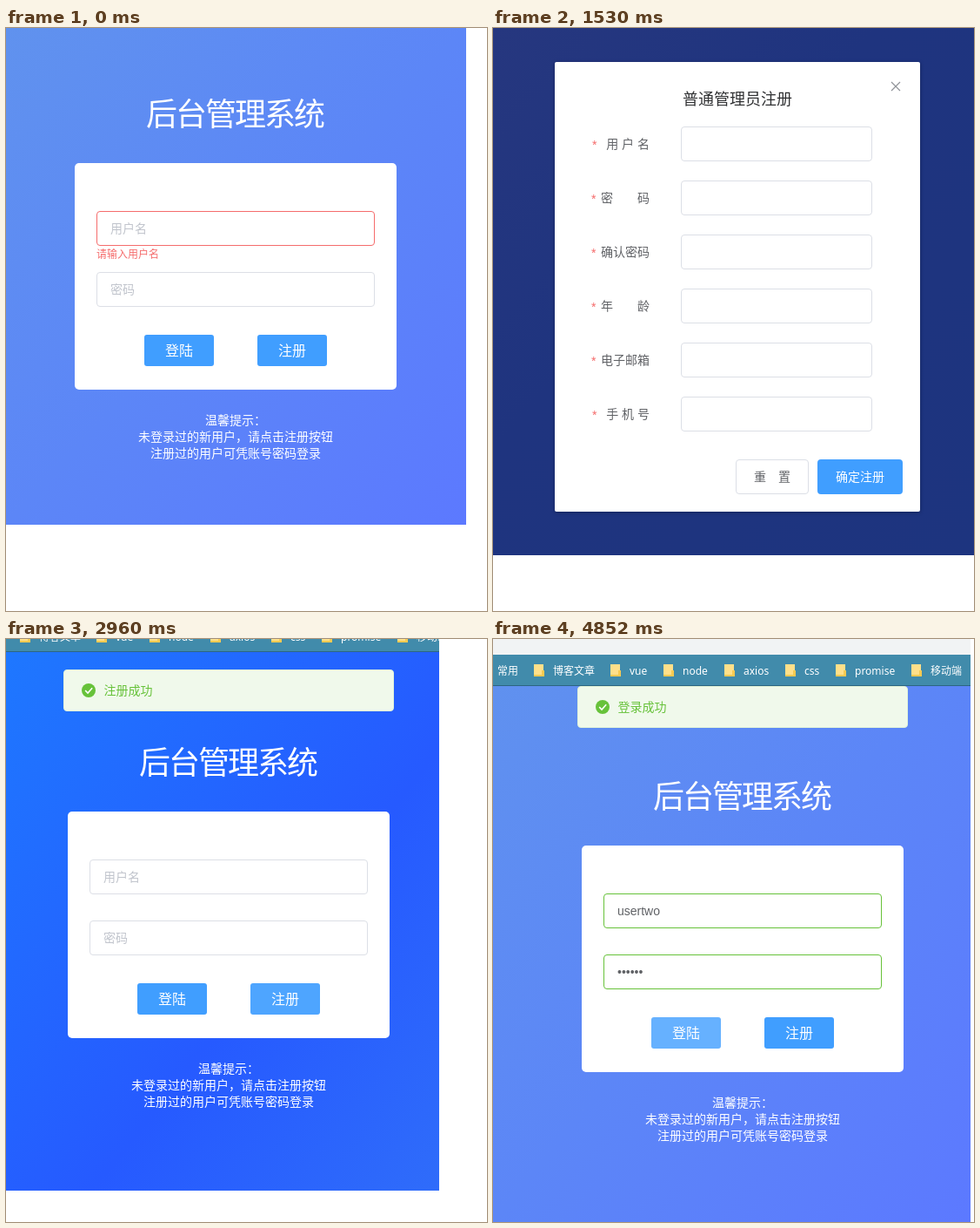
Animation of 553x669 px, one loop 5160 ms. Source, as an HTML page:

```html
<!DOCTYPE html>
<html lang="zh-CN">
<head>
<meta charset="utf-8">
<style>
html, body { margin: 0; width: 100%; height: 100%; overflow: hidden; background: #fff; }
#stage { display: block; }
text { font: 14px "Liberation Sans", "Noto Sans CJK SC", "Noto Sans CJK", sans-serif; white-space: pre; }
.mid { font-family: "Noto Sans CJK TC", sans-serif; }
.mark { font-family: "Noto Sans", "Noto Sans CJK SC", sans-serif; }
.dialog { filter: drop-shadow(0 1px 2px rgba(0, 0, 0, .3)); }
</style>
</head>
<body>
<svg id="stage" width="553" height="669"></svg>
<script>
const BLUE = '#409eff', HOVER = '#66b1ff', GREEN = '#67c23a', RED = '#f56c6c';
const LINE = '#dcdfe6', INK = '#606266', HINT = '#c0c4cc';
const USER = 'usertwo', DOTS = '••••••';

// y is the vertical centre of the line
const text = (x, y, s, fill, { size = 14, anchor = 'start', more = '' } = {}) =>
  `<text x="${x}" y="${y + Math.round(size * .37)}" fill="${fill}" text-anchor="${anchor}" style="font-size:${size}px;${more}">` +
  s.replace(/[，：]/g, '<tspan class="mid">$&</tspan>') + '</text>';
const centred = (x, y, s, fill, size) => text(x, y, s, fill, { size, anchor: 'middle' });

const rect = (x, y, w, h, fill, r = 0, extra = '') =>
  `<rect x="${x}" y="${y}" width="${w}" height="${h}" rx="${r}" fill="${fill}" ${extra}/>`;
const outlined = (x, y, w, h, stroke, fill = '#fff') =>
  rect(x + .5, y + .5, w - 1, h - 1, fill, 3.5, `stroke="${stroke}"`);
const group = (x, y, body) => `<g transform="translate(${x} ${y})">${body}</g>`;

const tick = (x, y, r) => `<circle cx="${x}" cy="${y}" r="${r}" fill="${GREEN}"/>` +
  `<path d="M${x - r * .48} ${y}l${r * .36} ${r * .38} ${r * .64} ${-r * .72}" fill="none" stroke="#fff" stroke-width="${r * .2}"/>`;

let gradients = 0;
function page(w, h, stops, body) {
  const id = 'bg' + gradients++;
  const list = stops.map(([at, c]) => `<stop offset="${at}" stop-color="${c}"/>`).join('');
  return `<svg width="${w}" height="${h}"><linearGradient id="${id}" x2="1" y2="1">${list}</linearGradient>` +
    rect(0, 0, w, h, `url(#${id})`) + body + '</svg>';
}

function login(x, y, { user, pass, userLine = LINE, passLine = LINE, error, caret, enter = BLUE, join = BLUE }) {
  const field = (top, value, hint, line) => outlined(25, top, 320, 40, line) +
    text(41, top + 20, value || hint, value ? INK : HINT);
  const button = (left, label, fill) => rect(left, 197, 80, 36, fill, 3) +
    centred(left + 40, 215, label, '#fff', 16);
  const tips = ['温馨提示：', '未登录过的新用户，请点击注册按钮', '注册过的用户可凭账号密码登录'];
  return group(x, y,
    text(184, -56, '后台管理系统', '#fff', { size: 36, anchor: 'middle', more: 'letter-spacing:-2px;font-weight:300' }) +
    rect(0, 0, 370, 260, '#fff', 5) +
    field(55, user, '用户名', userLine) + field(125, pass, '密码', passLine) +
    (error ? text(25, 105, '请输入用户名', RED, { size: 12 }) : '') +
    (caret ? rect(70, 137, 1, 16, '#303133') : '') +
    button(80, '登陆', enter) + button(210, '注册', join) +
    tips.map((s, i) => centred(185, 295 + 19 * i, s, '#fff')).join(''));
}

function register(x, y, values) {
  const labels = ['用 户 名', '密　　码', '确认密码', '年　　龄', '电子邮箱', '手 机 号'];
  const rows = labels.map((label, i) => {
    const mid = 94 + 62 * i;
    return text(label.includes(' ') ? 43 : 42, mid + 1, '*', RED) +
      text(109, mid, label, INK, { anchor: 'end' }) +
      outlined(145, mid - 20, 220, 40, values ? GREEN : LINE) +
      (values ? text(161, mid, values[i], INK) + tick(347.5, mid, 6.5) : '');
  });
  return group(x, y,
    rect(0, 0, 420, 516, '#fff', 2, 'class="dialog"') +
    centred(210, 42, '普通管理员注册', '#303133', 18) +
    '<path d="M387 23l10 10m0-10l-10 10" stroke="#909399" stroke-width="1.2"/>' +
    rows.join('') +
    outlined(208, 456, 84, 40, LINE) + centred(250, 476, '重　置', INK) +
    rect(302, 456, 98, 40, BLUE, 4) + centred(351, 476, '确定注册', '#fff'));
}

const message = (x, y, s) => group(x, y, outlined(0, 0, 380, 48, '#e1f3d8', '#f0f9eb') +
  tick(29, 24, 8) + text(46.5, 24, s, GREEN));

function bookmarks(x, y) {
  const items = { 常用: 5, 博客文章: 69, vue: 157, node: 218, axios: 288, css: 358, promise: 416, 移动端: 503 };
  const folder = left => rect(left, 11, 11, 13, '#ffe08a') + rect(left + 9, 18, 3, 7, '#f7ca52') +
    rect(left, 23, 10, 2, '#f7ca52');
  return group(x, y, rect(0, 0, 600, 35, '#418bab') + rect(0, 35, 600, 1, '#2d6682') +
    Object.entries(items).map(([name, left], i) => (i ? folder(left - 22) : '') +
      `<text class="mark" x="${left}" y="23" fill="#fff" style="font-size:12px">${name}</text>`).join(''));
}

const pale = [[0, '#6092ee'], [.5, '#5c86f7'], [1, '#5c79ff']];
const vivid = mid => [[0, '#1e78ff'], [mid, '#265aff'], [1, '#2f6cfa']];

const scenes = [
  [800, page(529, 570, pale, login(79, 155, { userLine: RED, error: true }))],
  [730, page(552, 559, [[0, '#2a64ff'], [.36, '#265aff'], [1, '#1e78ff']],
    login(100, 144, { userLine: RED, error: true, join: HOVER }))],
  [730, page(553, 605, [[0, '#26377f'], [.4, '#1f347f'], [1, '#1d347f']], register(71, 39))],
  [700, page(487, 586, [[0, '#27387f'], [1, '#1f347f']],
    register(35, 32, [USER, DOTS, DOTS, '28', '70055@mail.test', '10023450000']))],
  [700, page(498, 633, vivid(.6),
    bookmarks(-31, -21) + login(71, 198, { join: '#4ea5ff' }) + message(66, 35, '注册成功'))],
  [730, page(495, 585, vivid(.62),
    login(60, 164, { user: USER, pass: DOTS, userLine: GREEN, passLine: BLUE, caret: true }))],
  [770, page(549, 669, pale,
    rect(0, 0, 549, 18, '#f1f3f4') + bookmarks(0, 18) +
    login(102, 237, { user: USER, pass: DOTS, userLine: GREEN, passLine: GREEN, enter: HOVER }) +
    message(97, 54, '登录成功'))],
];

const stage = document.getElementById('stage');
stage.innerHTML = scenes.map(([, body]) => `<g>${body}</g>`).join('');
const layers = [...stage.children];
const loop = scenes.reduce((sum, [ms]) => sum + ms, 0);

function draw() {
  let left = performance.now() % loop, shown = 0;
  while (left >= scenes[shown][0]) left -= scenes[shown++][0];
  layers.forEach((layer, i) => layer.style.visibility = i === shown ? 'visible' : 'hidden');
  requestAnimationFrame(draw);
}
draw();
</script>
</body>
</html>
```
